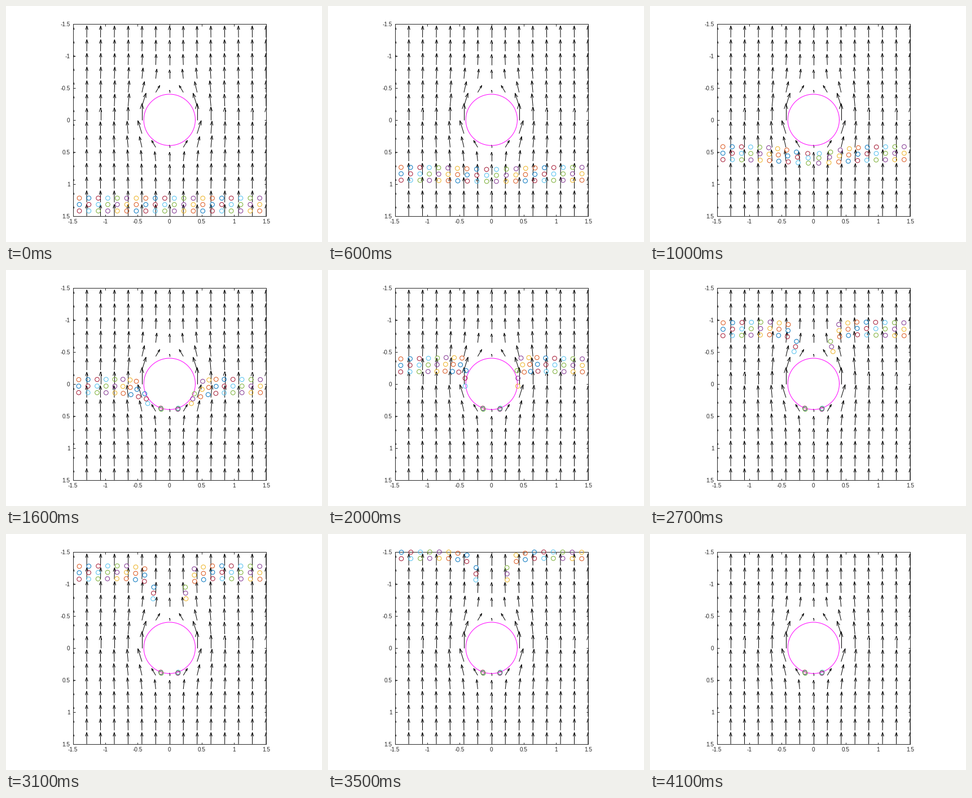
Animation of 560 by 420 pixels, one loop 4.9 s. Source, as a matplotlib script:

```python
import numpy as np
import matplotlib.pyplot as plt
from matplotlib.animation import FuncAnimation
from matplotlib.collections import LineCollection

W, H, DPI = 560, 420, 100
PX = 72 / DPI                 # points per pixel
LIM, RADIUS, DT = 1.5, 0.4, 0.08
NODES, STEPS, FRAMES = 15, 42, 49
CELL = 2 * LIM / (NODES - 1)
SIDE, LEFT, BOTTOM = 342.3, 118.65, 46.2
INK = (0.15, 0.15, 0.15)
COLORS = ["#0072bd", "#d95319", "#edb120", "#7e2f8e",
          "#77ac30", "#4dbeee", "#a2142f"]


def flow(x, y):
    """Potential flow past a sphere, zero inside it."""
    r = np.maximum(np.hypot(x, y), 1e-9)
    k = RADIUS**3 / 2
    u = 3 * k * x * y / r**5
    v = 3 * k * y**2 / r**5 - 1 - k / r**3
    outside = r >= RADIUS
    return np.where(outside, u, 0), np.where(outside, v, 0)


def sample(field, x, y):
    """Bilinear lookup on the node grid."""
    fx, fy = (x + LIM) / CELL, (y + LIM) / CELL
    i = np.clip(fx.astype(int), 0, NODES - 2)
    j = np.clip(fy.astype(int), 0, NODES - 2)
    a, b = fx - i, fy - j
    low = field[j, i] * (1 - a) + field[j, i + 1] * a
    high = field[j + 1, i] * (1 - a) + field[j + 1, i + 1] * a
    return low * (1 - b) + high * b


def trace(x, y):
    """Euler steps; a particle that would enter the sphere stays put."""
    path = []
    for _ in range(STEPS):
        alive = np.abs(y) <= LIM
        nx = x + DT * sample(u, x, y)
        ny = y + DT * sample(v, x, y)
        move = alive & (np.hypot(nx, ny) >= RADIUS)
        x, y = np.where(move, nx, x), np.where(move, ny, y)
        path.append(np.column_stack([x, np.where(np.abs(y) <= LIM, y, np.nan)]))
    return path


def arrows(x, y, u, v, head=0.33, spread=0.33):
    scale = 0.9 * np.hypot(2 * LIM / NODES, 2 * LIM / NODES) / np.hypot(u, v).max()
    lines = []
    for px, py, du, dv in zip(x.flat, y.flat, scale * u.flat, scale * v.flat):
        if du == dv == 0:
            continue
        tx, ty = px + du, py + dv
        lines.append([(px, py), (tx, ty)])
        lines.append([(tx - head * (du + spread * dv), ty - head * (dv - spread * du)),
                      (tx, ty),
                      (tx - head * (du - spread * dv), ty - head * (dv + spread * du))])
    return LineCollection(lines, colors="black", linewidths=PX)


nodes = np.linspace(-LIM, LIM, NODES)
gx, gy = np.meshgrid(nodes, nodes)
u, v = flow(gx, gy)

columns = np.linspace(1.4, -1.4, 20)
px, py = np.meshgrid(columns, [1.3, 1.4, 1.5])
path = trace(px.ravel(), py.ravel())
edge = [COLORS[(k + 3) % 7] for k in range(px.size)]

fig = plt.figure(figsize=(W / DPI, H / DPI), dpi=DPI, facecolor="white")
ax = fig.add_axes([LEFT / W, BOTTOM / H, SIDE / W, SIDE / H])
ax.set(xlim=(-LIM, LIM), ylim=(LIM, -LIM))
ticks = np.arange(-3, 4) / 2
names = [f"{t:g}" for t in ticks]
ax.set_xticks(ticks, names)
ax.set_yticks(ticks, names)
ax.tick_params(direction="in", top=True, right=True, length=3.5 * PX,
               width=PX, color=INK, labelcolor=INK, pad=5 * PX)
for label in ax.get_xticklabels() + ax.get_yticklabels():
    label.set(family="Liberation Sans", size=10 * PX)
for spine in ax.spines.values():
    spine.set(linewidth=PX, color=INK)

ax.add_collection(arrows(gx, gy, u, v), autolim=False)
t = np.linspace(0, 2 * np.pi, 200)
ax.plot(RADIUS * np.cos(t), RADIUS * np.sin(t), color="magenta", lw=PX)
dots = ax.scatter(px.ravel(), py.ravel(), s=(7.6 * PX)**2, facecolors="none",
                  edgecolors=edge, linewidths=PX, zorder=3, clip_on=False)


def draw(frame):
    dots.set_offsets(np.ma.masked_invalid(path[min(frame, STEPS - 1)]))
    return [dots]


anim = FuncAnimation(fig, draw, frames=FRAMES, interval=100,
                     repeat=True, repeat_delay=0)
plt.show()
```
